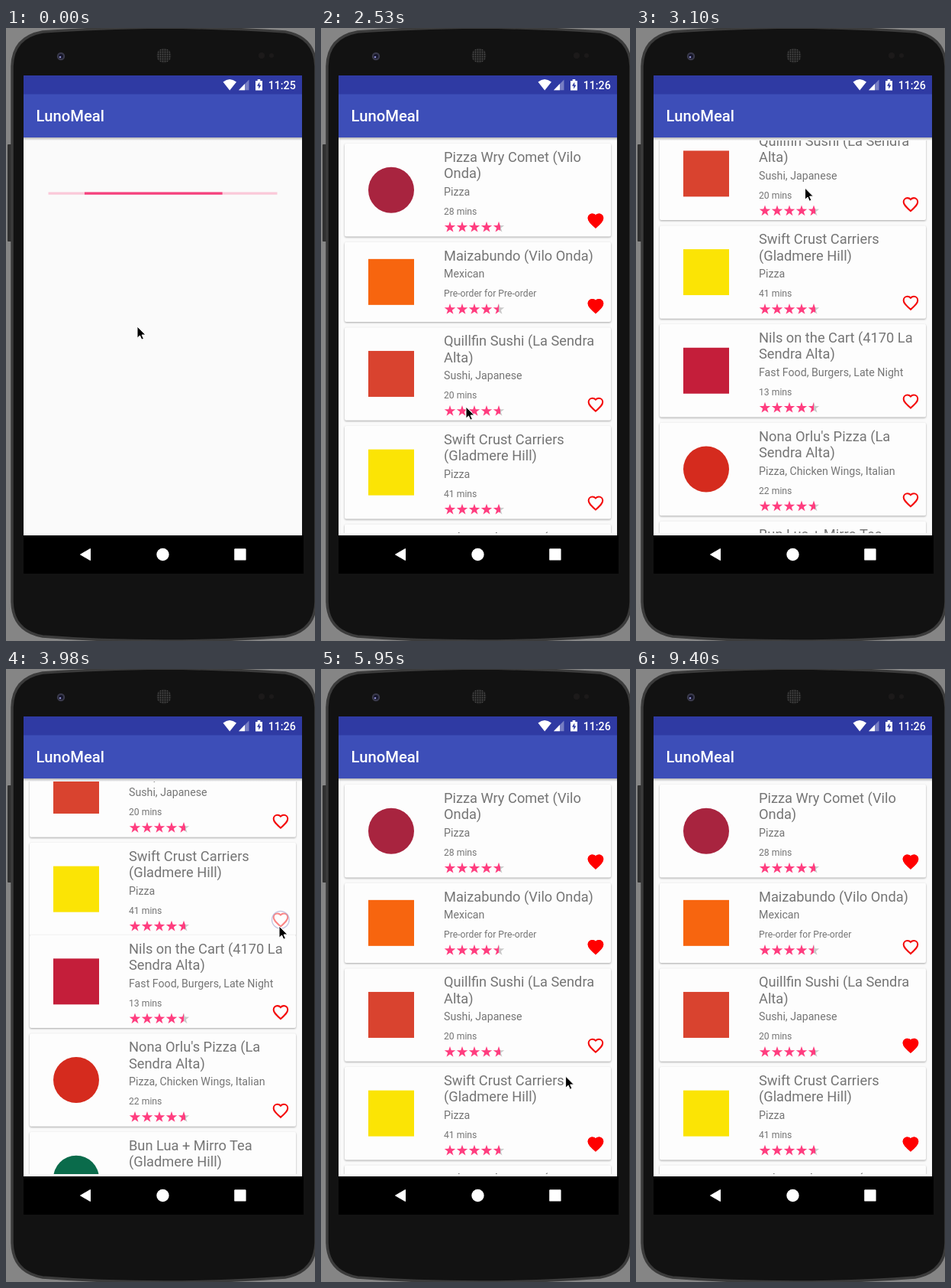
Animation of 405 by 801 pixels, one loop 9920 ms. Source, as an HTML page:

```html
<!DOCTYPE html>
<html lang="en">
<head>
<meta charset="utf-8">
<title>Restaurant list</title>
<style>
  html, body { margin: 0; height: 100%; overflow: hidden; background: #858585; }
  svg { display: block; width: 100vw; height: 100vh; font-family: Roboto, sans-serif; }
  .medium { font-weight: 500; fill: #fff; }
  .card { filter: drop-shadow(0 1px 1px #0005); }
  .name { font-size: 18.25px; fill: #757575; }
  .kind { font-size: 14.2px; fill: #757575; }
  .wait { font-size: 12.2px; fill: #757575; }
</style>
</head>
<body>
<svg viewBox="0 0 405 801">
  <defs>
    <clipPath id="view"><rect x="23" y="147" width="365" height="513"/></clipPath>
    <linearGradient id="fade" x2="0" y2="1">
      <stop stop-color="#000" stop-opacity=".28"/><stop offset="1" stop-color="#000" stop-opacity="0"/>
    </linearGradient>
    <linearGradient id="part65">
      <stop offset=".62" stop-color="#ff3d7f"/><stop offset=".62" stop-color="#c9c9c9"/>
    </linearGradient>
    <linearGradient id="part50">
      <stop offset=".5" stop-color="#ff3d7f"/><stop offset=".5" stop-color="#c9c9c9"/>
    </linearGradient>
    <pattern id="mesh" width="3" height="3" patternUnits="userSpaceOnUse">
      <rect width="3" height="3" fill="#1a1a1a"/><circle cx="1.5" cy="1.5" r=".9" fill="#4a4a4a"/>
    </pattern>
  </defs>

  <!-- phone body -->
  <rect width="405" height="801" fill="#858585"/>
  <rect x="2" y="152" width="6" height="127" rx="1" fill="#303030"/>
  <path d="M8 50Q9 12 48 5Q120 0 207 -1Q294 0 366 5Q405 12 406 50V750Q405 788 366 795Q290 801 207 801Q124 801 48 795Q9 788 8 750Z"
        fill="#121212" stroke="#3b3b3b" stroke-width="3.5"/>
  <circle cx="72" cy="37" r="5.2" fill="#39394a"/>
  <circle cx="72" cy="37" r="3" fill="#15152a"/>
  <circle cx="71" cy="38" r="1.3" fill="#8f8fd0"/>
  <circle cx="207" cy="36" r="9.5" fill="url(#mesh)"/>
  <circle cx="335" cy="36" r="4" fill="#1c1a1a"/>
  <circle cx="348" cy="36" r="3" fill="#1c1a1a"/>

  <!-- screen -->
  <rect x="23" y="62" width="365" height="601" fill="#fafafa"/>
  <g id="progress">
    <rect x="55.5" y="214.5" width="300" height="3.2" fill="#fbc8d8"/>
    <rect class="bar" y="214.5" height="3.2" fill="#f5417d"/>
    <rect class="bar" y="214.5" height="3.2" fill="#f5417d"/>
  </g>
  <g clip-path="url(#view)">
    <g id="list"></g>
    <ellipse id="glow" cx="205" cy="147" rx="215" ry="34" fill="#3d4eb8"/>
  </g>
  <rect x="23" y="143" width="365" height="4" fill="url(#fade)"/>
  <rect x="23" y="86" width="365" height="57" fill="#3d4eb8"/>
  <rect x="23" y="62" width="365" height="24.5" fill="#2f3aa3"/>
  <text class="medium" x="39.5" y="122.3" font-size="20.2">LunoMeal</text>

  <!-- status icons -->
  <path d="M284.5 70.5Q293 63.5 302 70.5L293.2 81.5Z" fill="#fff"/>
  <path d="M305 81.3L318.5 67.5V81.3Z" fill="#fff" opacity=".35"/>
  <path d="M305 81.3L313 73.1V81.3Z" fill="#fff"/>
  <path d="M327 69h2.7v-2h3.6v2h2.7v12.5h-9Z" fill="#fff"/>
  <path d="M332.3 70.5l-3.3 5.3h2.2v4l3.2-5.3h-2.1Z" fill="#2f3aa3"/>
  <text id="clock" class="medium" x="343.7" y="79.6" font-size="14.2"></text>

  <!-- navigation -->
  <rect x="23" y="663" width="367" height="50" fill="#000"/>
  <path d="M97.5 688L110.5 680.5V695.5Z" fill="#fff" stroke="#fff" stroke-linejoin="round"/>
  <circle cx="205.5" cy="688" r="8.2" fill="#fff"/>
  <rect x="299.2" y="680.2" width="15.4" height="15.4" rx="1.2" fill="#fff"/>

  <circle id="touch" r="11.3" fill="#fff" fill-opacity=".5" stroke="#a9a9d2" stroke-opacity=".65" stroke-width="1.4"/>
  <path id="cursor" d="M0 0V15.2L3.5 12L5.8 17.2L8.4 16.1L6.1 11H10.9Z" fill="#000" stroke="#fff"/>
</svg>

<script type="module">
const LOOP = 9920, FADE = 250, LINE = 21.4, PINK = '#ff3d7f';
const HEART = 'M12 21.35l-1.45-1.32C5.4 15.36 2 12.28 2 8.5 2 5.42 4.42 3 7.5 3c1.74 0 3.41.81 4.5 2.09C13.09 3.81 14.76 3 16.5 3 19.58 3 22 5.42 22 8.5c0 3.78-3.4 6.86-8.55 11.54z';
const $ = id => document.getElementById(id);

// toggle: when the heart changes state
const cards = [
  { name: ['Pizza Wry Comet (Vilo', 'Onda)'], kind: 'Pizza', wait: '28 mins', color: '#a8243f', round: true, liked: true },
  { name: ['Maizabundo (Vilo Onda)'], kind: 'Mexican', wait: 'Pre-order for Pre-order', color: '#f7650f', half: true, liked: true, toggle: 8310 },
  { name: ['Quillfin Sushi (La Sendra', 'Alta)'], kind: 'Sushi, Japanese', wait: '20 mins', color: '#d9432f', toggle: 6450 },
  { name: ['Swift Crust Carriers', '(Gladmere Hill)'], kind: 'Pizza', wait: '41 mins', color: '#fbe405', toggle: 4100 },
  { name: ['Nils on the Cart (4170 La', 'Sendra Alta)'], kind: 'Fast Food, Burgers, Late Night', wait: '13 mins', color: '#c41e3a', half: true },
  { name: ['Nona Orlu\'s Pizza (La', 'Sendra Alta)'], kind: 'Pizza, Chicken Wings, Italian', wait: '22 mins', color: '#d52b1e', round: true },
  { name: ['Bun Lua + Mirro Tea', '(Gladmere Hill)'], kind: 'Vietnamese, Noodles', wait: '35 mins', color: '#0a6b4b', round: true },
];

// pointer moves: start, end, target x, target y
const moves = [
  [2130, 2500, 190, 495], [2600, 2980, 194, 200], [3000, 3420, 383, 262], [3450, 3740, 359, 326],
  [3920, 3980, 358, 336], [4900, 4975, 286, 289], [4980, 5276, 302, 556], [5700, 6350, 358, 484],
  [6700, 6960, 360, 318], [7050, 7530, 358, 365], [8560, 9160, 383, 782],
];
const touches = [[2600, 2950], [3920, 4060], [4980, 5300], [6400, 6500], [8070, 8310]];
const scrollKeys = [[2630, 0], [2820, 134.5], [3000, 250], [3640, 293], [5000, 293], [5140, 226], [5380, 0]];

// the two runners of the indeterminate bar: centre and width over one cycle
const runners = [
  { mid: [[.2, -.95], [.59, -.115], [1, 1.055]], size: [[.37, .08], [.69, .66], [1, .08]] },
  { mid: [[0, -.05], [.25, .33], [.48, .795], [1, 1.555]], size: [[0, .08], [.19, .457], [.44, .67], [1, .08]] },
];

const clamp = v => Math.min(1, Math.max(0, v));
const ramp = (t, from, to) => clamp((t - from) / (to - from));
const smooth = u => u * u * (3 - 2 * u);

// smooth monotone curve through [time, value] keys
function at(keys, t) {
  const n = keys.length - 1;
  if (t <= keys[0][0]) return keys[0][1];
  if (t >= keys[n][0]) return keys[n][1];
  const i = keys.findIndex(k => k[0] > t) - 1;
  const slope = k => k < 0 || k >= n ? 0 : (keys[k + 1][1] - keys[k][1]) / (keys[k + 1][0] - keys[k][0]);
  const tangent = k => {
    const a = slope(k - 1), b = slope(k);
    return a * b > 0 ? 2 * a * b / (a + b) : 0;
  };
  const [t0, v0] = keys[i], [t1, v1] = keys[i + 1], u = (t - t0) / (t1 - t0), v = 1 - u;
  return v0 + (v1 - v0) * smooth(u) + (t1 - t0) * u * v * (tangent(i) * v - tangent(i + 1) * u);
}

function pointer(t) {
  let x = 172, y = 390;
  for (const [from, to, tx, ty] of moves) {
    const u = smooth(ramp(t, from, to));
    x += (tx - x) * u;
    y += (ty - y) * u;
  }
  return [x, y];
}

function star(cx, cy, fill) {
  const points = Array.from({ length: 10 }, (_, i) => {
    const a = i * Math.PI / 5, r = i % 2 ? 3 : 7.6;
    return `${cx + r * Math.sin(a)},${cy - r * Math.cos(a)}`;
  });
  return `<polygon points="${points.join(' ')}" fill="${fill}"/>`;
}

let nextTop = 151;
function cardMarkup(card) {
  const { name, kind, wait, color, round, half } = card;
  const extra = LINE * (name.length - 1), height = name.length > 1 ? 121.5 : 104.3;
  const text = (cls, y, s) => `<text class="${cls}" x="161" y="${y}">${s}</text>`;
  card.top = nextTop;
  nextTop += height + 7.2;
  return `<g><rect class="card" x="31" width="349" height="${height}" rx="2" fill="#fdfdfd"/>`
    + `<rect class="badge" x="62" y="${height / 2 - 30}" width="60" height="60" rx="${round ? 30 : 0}" fill="${color}"/>`
    + name.map((s, i) => text('name', 24 + LINE * i, s)).join('')
    + text('kind', 46.6 + extra, kind) + text('wait', 71.8 + extra, wait)
    + [0, 1, 2, 3].map(i => star(169 + 16 * i, 88 + extra, PINK)).join('')
    + star(233, 88 + extra, `url(#part${half ? 50 : 65})`)
    + `<g transform="translate(347.6 ${height - 33}) scale(1.03)">`
    + `<path d="${HEART}" transform="translate(1.2 1.2) scale(.9)" fill="none" stroke="#f40b0b" stroke-width="2.2"/>`
    + `<path class="full" d="${HEART}" fill="#f00"/></g></g>`;
}
$('list').innerHTML = cards.map(cardMarkup).join('');

const rows = [...$('list').children];
const bars = document.querySelectorAll('.bar');
const show = (el, on) => el.setAttribute('visibility', on ? 'inherit' : 'hidden');
const place = (el, x, y) => el.setAttribute('transform', `translate(${x} ${y})`);

function draw(t) {
  const loaded = t >= 1060;
  show($('progress'), !loaded);
  show($('list'), loaded);

  const cycle = (t / 2000 + .316) % 1;
  runners.forEach(({ mid, size }, i) => {
    const centre = at(mid, cycle), half = at(size, cycle) / 2;
    const left = clamp(centre - half), right = clamp(centre + half);
    bars[i].setAttribute('x', 55.5 + 300 * left);
    bars[i].setAttribute('width', 300 * (right - left));
  });

  // rows below a freshly liked card sit higher for a moment
  const offset = at(scrollKeys, t);
  const shift = t < 3920 ? 0 : 8 * (1 - smooth(ramp(t, 4300, 4600)));
  rows.forEach((row, i) => {
    const { top, liked, toggle = LOOP } = cards[i], change = ramp(t, toggle, toggle + FADE);
    place(row, 0, top - offset - (i > 3 ? shift : 0));
    show(row.querySelector('.badge'), t >= 1110 + 40 * i);
    row.querySelector('.full').setAttribute('opacity', liked ? 1 - change : change);
  });
  $('glow').setAttribute('opacity', .22 * ramp(t, 5350, 5450) * (1 - ramp(t, 5450, 5860)));
  $('clock').textContent = t < 2300 ? '11:25' : '11:26';

  // the touch ring trails the pointer
  const [tx, ty] = pointer(t - 45);
  place($('cursor'), ...pointer(t));
  place($('touch'), tx + 1, ty);
  show($('cursor'), t < 9400);
  show($('touch'), touches.some(([from, to]) => t >= from && t < to));
}

const begin = performance.now();
function tick() {
  draw((performance.now() - begin) % LOOP);
  requestAnimationFrame(tick);
}
tick();
</script>
</body>
</html>
```
